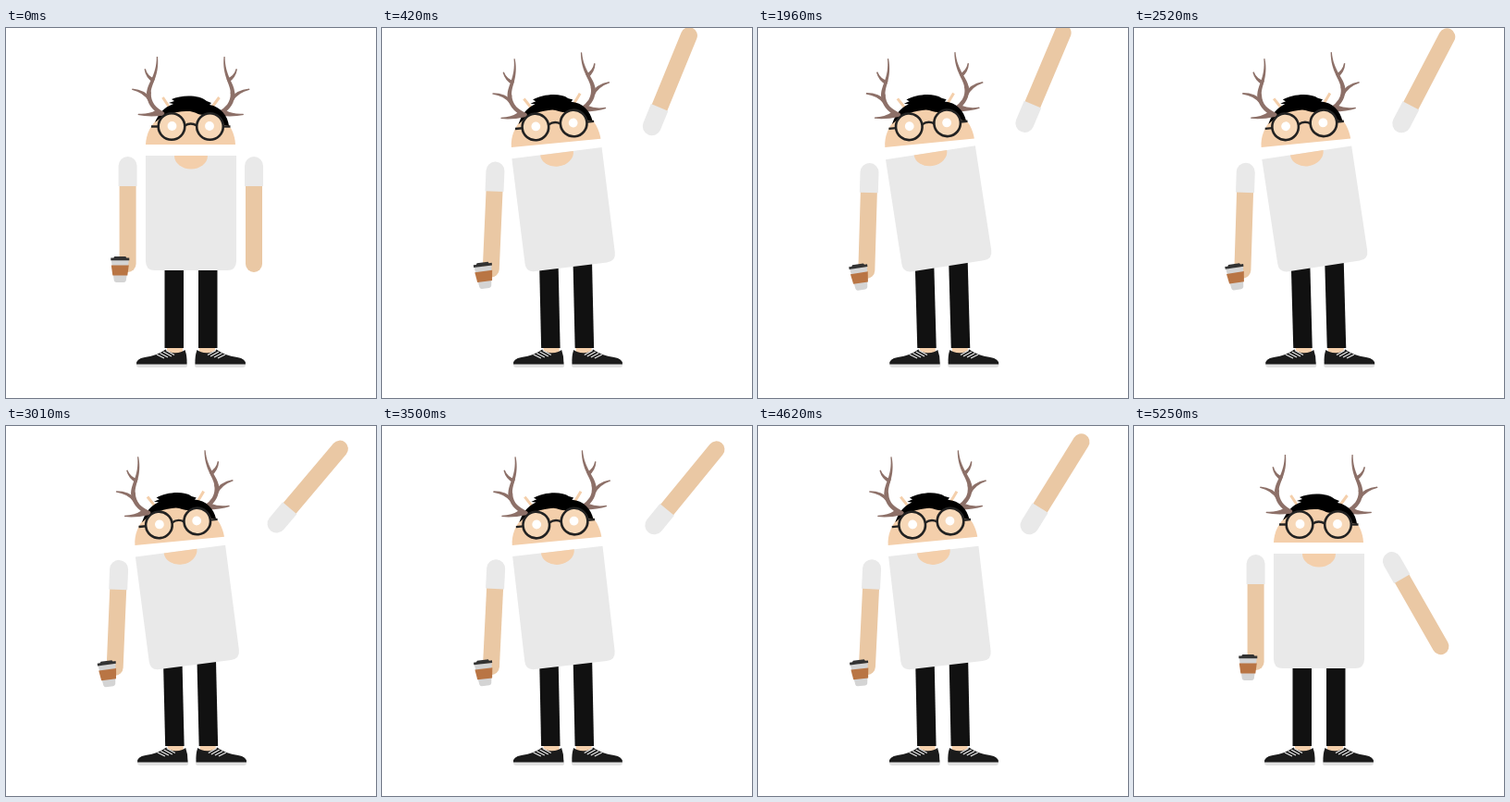
Recreate the animation shown at these times as an HTML page. Size 400x400 px, loop 5.32 s.

```html
<!DOCTYPE html>
<html lang="en">
<head>
<meta charset="utf-8">
<title>Waving deer man</title>
<style>
  html, body { margin: 0; width: 100%; height: 100%; overflow: hidden; background: #fff; }
  svg { display: block; width: 100vw; height: 100vh; }
</style>
</head>
<body>
<svg viewBox="0 0 400 400">
  <defs>
    <g id="arm">
      <path fill="#eac8a4" d="M-9 15H9V106A9 9 0 0 1 -9 106Z"/>
      <path fill="#e9e9e9" d="M-10 22V0A10 10 0 0 1 10 0V22Z"/>
    </g>
    <g id="leg">
      <rect x="174" y="343" width="17" height="9" fill="#f4cfab"/>
      <rect x="171.5" y="240" width="20.5" height="106" fill="#111"/>
      <path fill="#e2e2e2" d="M141 361H196V365Q196 367 193 367H144Q141 367 141 364Z"/>
      <path fill="#1b1b1b" d="M141 363.500Q140.500 357.500 150 356Q164 354 172.500 347.500Q177 351.500 183 351.300Q190 351 193.500 348Q196 355 195.500 363.500Z"/>
      <path fill="none" stroke="#e8e8e8" stroke-width="1.300" d="M163 353L171 357M166.500 351.500L175 356M170 350L179 355M173 348.500L182 353.500"/>
    </g>
    <g id="antler" fill="#8d7068">
      <path fill="none" stroke="#8d7068" stroke-width="4.600" stroke-linecap="round" d="M169 92.500C161 88 154 82 154.500 70"/>
      <path d="M152.200 71C152 60 163 52 162.800 31L164 31C166 53 156 61 156.800 71Z"/>
      <path d="M159 59Q151 54 149.500 44.500L150.800 44Q153 52 161 55Z"/>
      <path d="M154 79Q149 70 136 66.800L136.500 65.500Q151 67 156.500 76Z"/>
      <path d="M169 94.800Q154 96.500 142.500 94L143 92.700Q154 93.500 162 89Z"/>
    </g>
    <g id="specs">
      <circle cx="179" cy="106.500" r="13.500" fill="#f7d8b8"/>
      <circle cx="179.500" cy="106" r="4.900" fill="#fff"/>
      <circle cx="179" cy="106.500" r="14.300" fill="none" stroke="#222" stroke-width="2.600"/>
      <path d="M157 106.500H165" stroke="#222" stroke-width="2.400"/>
    </g>
  </defs>

  <g id="lower">
    <use href="#leg"/>
    <use href="#leg" transform="matrix(-1 0 0 1 400 0)"/>
  </g>
  <use id="armL" href="#arm"/>
  <use id="armR" href="#arm"/>
  <g id="cup">
    <path fill="#d4d4d4" d="M-9.500 -10H9.500L6.500 12Q6 14 4 14H-4Q-6 14 -6.500 12Z"/>
    <path fill="#b97544" d="M-9.500 -4.500H9.500L8 6.500H-8Z"/>
    <path fill="#333" d="M-6 -14H6L7 -12.500H10V-9.800H-10V-12.500H-7Z"/>
  </g>
  <g id="torso">
    <path fill="#e9e9e9" d="M151 138H249V252Q249 262 239 262H161Q151 262 151 252Z"/>
    <path fill="#f4cfab" d="M182 138H218A18 14.500 0 0 1 182 138Z"/>
  </g>
  <g id="head">
    <path fill="none" stroke="#f4cfab" stroke-width="3" d="M169.500 75L178 88M230.500 75L221 88"/>
    <path fill="#f4cfab" d="M151 126C152 103 171 86 199.500 86S247 103 248 126Z"/>
    <use href="#antler" transform="matrix(-1 0 0 1 399.500 0)"/>
    <path d="M161 102C165 93 170 86 181 82L176 81L182 79L179 77C190 72 209 72 217 79L222 81L220 83C232 85 240 95 241 106L236 105C233 97 226 93 218 93C210 96 206 91 199 90C187 90 174 91 161 102Z"/>
    <use href="#antler"/>
    <use href="#specs"/>
    <use href="#specs" transform="matrix(-1 0 0 1 399.500 0)"/>
    <path fill="none" stroke="#222" stroke-width="2.400" d="M193.300 105.500Q199.700 101.500 206.200 105.500"/>
  </g>
</svg>
<script>
const LOOP = 5320, STEP = 70, WAVE = 591;
const RAD = Math.PI / 180;
const HIP = [172, 225];
const KNEE_Y = 318;

// [time, amount] tables for entering and leaving the wave
const armRamp = [[0, 0], [70, .08], [140, .34], [210, .8], [280, .97], [350, 1],
                 [5040, 1], [5110, .84], [5180, .53], [5250, .208], [5320, 0]];
const leanRamp = [[0, 0], [70, .1], [140, .35], [210, .65], [280, .86], [350, .97], [420, 1],
                  [4970, 1], [5040, .8], [5110, .45], [5180, .12], [5250, 0], [5320, 0]];

function ramp(table, t) {
  const i = table.findIndex(row => row[0] > t);
  const [t0, v0] = table[i - 1], [t1, v1] = table[i];
  return v0 + (v1 - v0) * (t - t0) / (t1 - t0);
}

// Counter-clockwise turn of a point around a pivot
function turn([x, y], [px, py], deg) {
  const s = Math.sin(deg * RAD), c = Math.cos(deg * RAD);
  return [px + (x - px) * c + (y - py) * s, py - (x - px) * s + (y - py) * c];
}

const swing = (t, phase) => Math.cos(2 * Math.PI * (t / WAVE - phase));

const part = id => document.getElementById(id);
const [lower, armL, armR, cup, torso, head] =
  ["lower", "armL", "armR", "cup", "torso", "head"].map(part);

function place(el, [x, y], deg, [ox, oy] = [0, 0]) {
  el.setAttribute("transform", `translate(${x} ${y}) rotate(${-deg}) translate(${-ox} ${-oy})`);
}

function draw(t) {
  const k = ramp(leanRamp, t);
  const lean = k * (7.7 - 1.15 * swing(t, .88));

  // Legs shear so the shoes stay level
  lower.setAttribute("transform",
    `translate(0 ${KNEE_Y}) skewX(${lean * .18}) translate(0 ${-KNEE_Y})`);
  place(torso, HIP, lean, HIP);

  const neck = [199.5, 126];
  place(head, turn(neck, [181, 216], lean), 5.5 * k, neck);

  const shoulder = turn([131.6, 149], HIP, lean);
  const hang = -k * (6.1 - .5 * lean);
  place(armL, shoulder, hang);
  const hand = turn([shoulder[0], shoulder[1] + 106], shoulder, hang);
  place(cup, turn([hand[0] - 8.3, hand[1] + 6], hand, lean), lean);

  const tilt = 27.3 + 14.5 * swing(t, .017);
  const raise = ramp(armRamp, t) * (180 - tilt);
  const lift = Math.min(1, raise / 140);
  const joint = turn([268 + 37.5 * lift ** .8, 149 - 13.5 * (1 - Math.cos(Math.PI * lift))], HIP, lean);
  joint[0] += k * .08 * (tilt - 21);
  place(armR, joint, raise);
}

const start = performance.now();
function tick() {
  const t = (performance.now() - start) % LOOP;
  draw(Math.floor(t / STEP) * STEP);
  requestAnimationFrame(tick);
}
tick();
</script>
</body>
</html>
```
